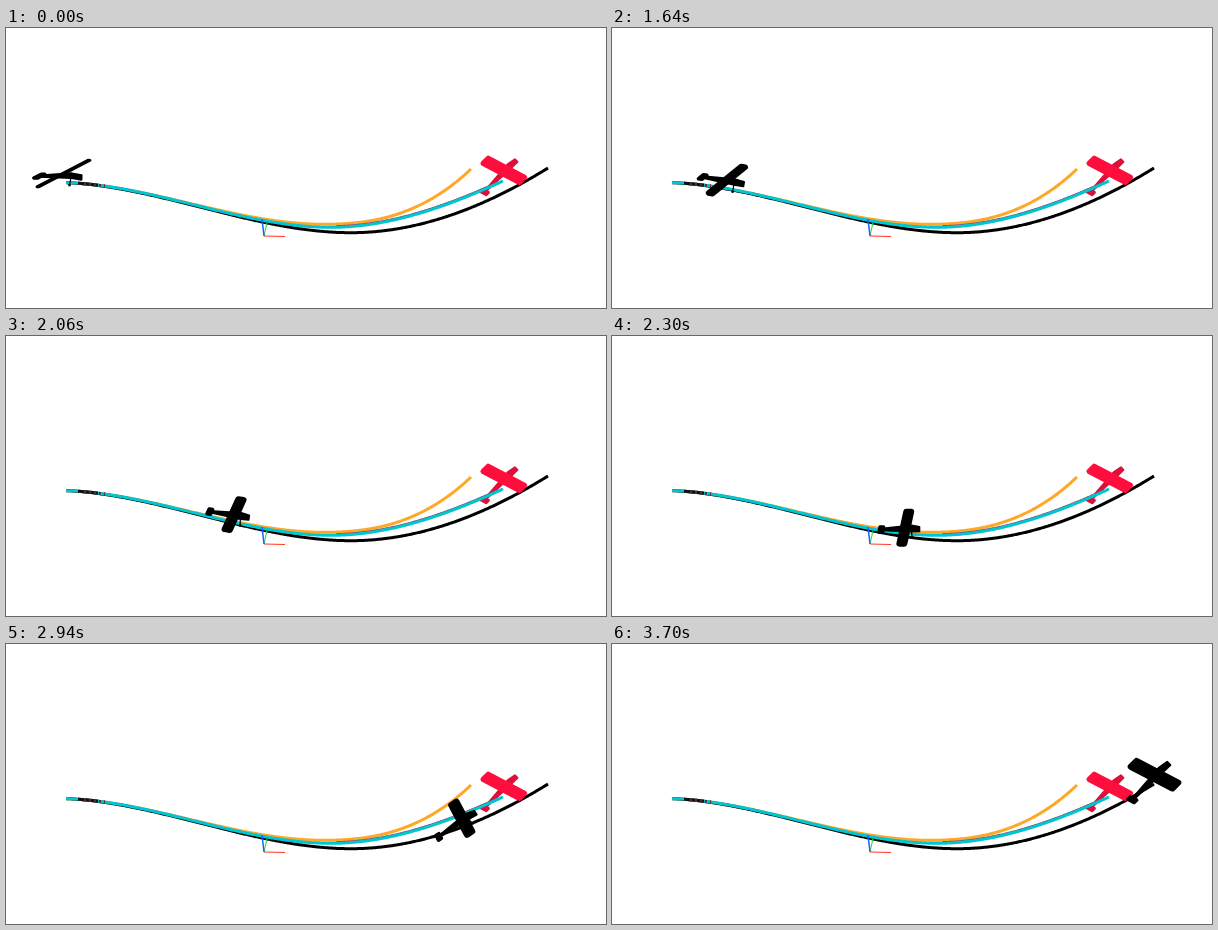
Recreate the animation shown at these times as an HTML page with a canvas. Size 600 by 280 pixels, loop 4.51 s.

```html
<!DOCTYPE html>
<html lang="en">
<head>
<meta charset="utf-8">
<title>Flight paths</title>
<style>
  html, body { margin: 0; width: 100%; height: 100%; overflow: hidden; background: #fff; }
  canvas { display: block; width: 600px; height: 280px; }
</style>
</head>
<body>
<canvas id="stage" width="600" height="280"></canvas>
<script>
const ctx = document.getElementById('stage').getContext('2d');
const LOOP = 4510, TAKEOFF = 1420, ARRIVAL = 3360;

// Every path leaves the same start, sinks to its low point and climbs to its end.
const START = { x: 60, y: 154.6 };
const path = (lowX, lowY, endX, endY, sink, climb) =>
  ({ low: { x: lowX, y: lowY }, end: { x: endX, y: endY }, sink, climb });
const black = path(345, 204.7, 542, 140, .045, -.62);
const cyan = path(325, 199.3, 497, 153, .03, -.46);
const orange = path(318, 196.3, 465, 141, .035, -.95);

function cubic(a, b, slopeA, slopeB, x) {
  const w = b.x - a.x, s = (x - a.x) / w, r = 1 - s;
  return a.y + (b.y - a.y) * s * s * (3 - 2 * s) + w * s * r * (slopeA * r - slopeB * s);
}

function heightAt({ low, end, sink, climb }, x) {
  return x < low.x ? cubic(START, low, sink, 0, x) : cubic(low, end, 0, climb, x);
}

function strokeLine(points, color, width) {
  ctx.strokeStyle = color;
  ctx.lineWidth = width;
  ctx.beginPath();
  points.forEach(p => ctx.lineTo(...p));
  ctx.stroke();
}

function trace(route, color, width, from = START.x, to = route.end.x, dy = 0) {
  const points = [];
  for (let x = from; x <= to; x++) points.push([x, heightAt(route, x) + dy]);
  strokeLine(points, color, width);
}

function roundedShape(points, color, round) {
  ctx.fillStyle = color;
  strokeShape(points, color, round);
  ctx.fill();
}

function strokeShape(points, color, round) {
  ctx.strokeStyle = color;
  ctx.lineWidth = round;
  ctx.beginPath();
  points.forEach(p => ctx.lineTo(...p));
  ctx.closePath();
  ctx.stroke();
}

const add = (a, b, k = 1) => [a[0] + b[0] * k, a[1] + b[1] * k];
const scale = (a, k) => [a[0] * k, a[1] * k];
const poly = (u, ...terms) => terms.reduceRight((sum, c) => sum * u + c, 0);

// Four corners spanned by two half axes around a centre
const panel = (c, a, b) =>
  [add(add(c, a), b), add(add(c, a), b, -1), add(add(c, a, -1), b, -1), add(add(c, a, -1), b)];

const shrink = (v, by) => scale(v, Math.max(0, 1 - by / Math.hypot(...v)));

// The plane as seen while it turns, u running from -1 (first) to 1 (last)
function attitude(u) {
  const nose = [poly(u, 15, -2, 2), poly(u, 1.2, -8, -5.2)];
  const tail = [poly(u, -24, 1, .8), poly(u, 2.5, 22.7, 11.3, -11.5)];
  const edgeOn = Math.max(0, -u) ** 4;
  return {
    nose, tail,
    span: [poly(u, 3.5, -14, -1.75, -10.75), poly(u, -18.4, -2.9, 5.5, 3.8)],
    chord: scale(add(nose, tail, -1), .125 * (1 - .6 * edgeOn)),
    wheel: [poly(u, 7, 4, 3), poly(u, 9.5, -5, -3)],
    girth: 3 - .7 * edgeOn
  };
}

function drawPlane(x, y, size, u, wingColor, bodyColor) {
  const { nose, tail, span, chord, wheel, girth } = attitude(u);
  const body = add(nose, tail, -1);
  const ahead = scale(body, 1 / Math.hypot(...body));
  const side = [-ahead[1], ahead[0]];
  const cabin = add(scale(nose, .5), tail, .05);

  ctx.save();
  ctx.translate(x, y);
  ctx.scale(size, size);
  strokeLine([add(scale(nose, .4), [0, 2]), wheel], bodyColor, 1.2);
  strokeLine([add(wheel, [0, -1.2]), add(wheel, [0, 1.2])], bodyColor, 2.4);
  const tip = add(nose, ahead, -1);
  roundedShape([
    add(tip, side, 2.2), add(cabin, side, girth), add(tail, side, .7),
    add(tail, side, -.7), add(cabin, side, -girth), add(tip, side, -2.2)
  ], bodyColor, 2);
  roundedShape(panel(tail, scale(span, .14), scale(ahead, 1.8)), bodyColor, 3.4);
  const round = Math.min(6, Math.hypot(...chord) * 1.3);
  roundedShape(panel([0, 0], shrink(span, round * .4), shrink(chord, round * .4)),
    wingColor, round);
  ctx.restore();
}

function drawScene() {
  trace(orange, '#ffa726', 3);
  trace(black, '#000', 3);
  drawPlane(497.8, 142.3, .87, 1, '#ff0d3d', '#dc1038');
  trace(cyan, '#8c3f68', 2.4, 330, 492, -.9);
  trace(cyan, '#00c5d2', 3);
  trace(cyan, '#111', 3, 72, 92);
  ctx.setLineDash([2, 3]);
  trace(cyan, '#5b2b38', 3, 78, 99);
  ctx.setLineDash([]);

  strokeLine([[258, 208], [261, 194.5]], '#35d64a', 1.1);
  strokeLine([[258, 208], [279, 208.5]], '#ff3a24', 1.2);
  strokeLine([[258, 208], [256, 191]], '#1266ff', 1.5);
}

function drawFlight(t) {
  const s = Math.min(1, Math.max(0, (t - TAKEOFF) / (ARRIVAL - TAKEOFF)));
  const progress = s + .28 * s * s * (1 - s);
  const x = 58.5 + 484 * progress;
  const idle = t < TAKEOFF ? 1 : 0;
  drawPlane(x - idle, heightAt(black, x) - 9, 1, 2 * progress - 1, '#000', '#000');
}

function render(t) {
  ctx.fillStyle = '#fff';
  ctx.fillRect(0, 0, 600, 280);
  ctx.lineJoin = 'round';
  drawScene();
  drawFlight(t);
}

let start;
function tick(now) {
  start ??= now;
  render((now - start) % LOOP);
  requestAnimationFrame(tick);
}
render(0);
requestAnimationFrame(tick);
</script>
</body>
</html>
```
